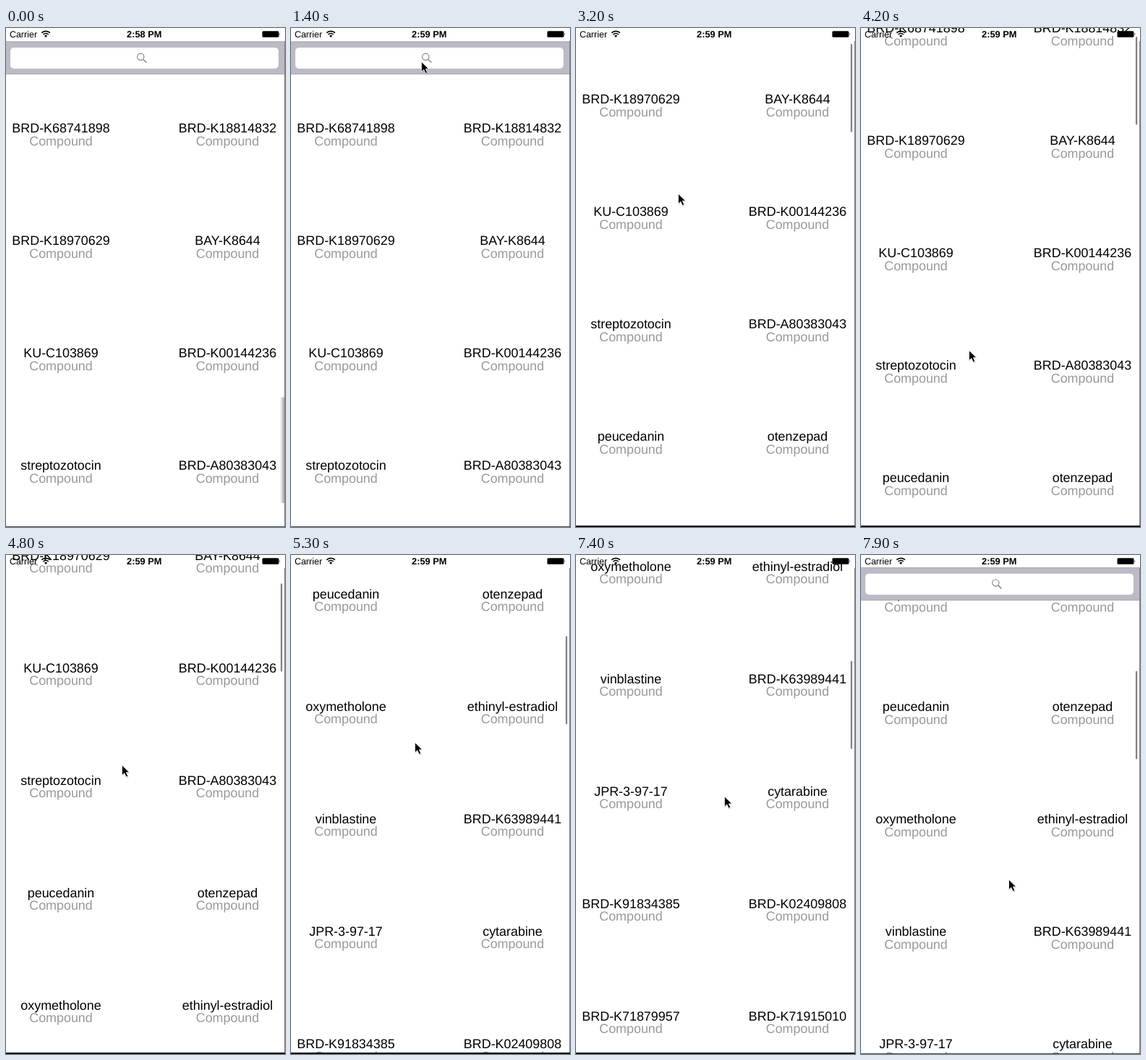
Write an HTML page that moves like this. It is 386 by 688 pixels and loops after 8 s.

```html
<!DOCTYPE html>
<html lang="en">
<head>
<meta charset="utf-8">
<title>Compound list</title>
<style>
  html, body { margin: 0; width: 100%; height: 100%; overflow: hidden; background: #fff; }
  svg { display: block; width: 100vw; height: 100vh; }
  text {
    font-family: "Liberation Sans", Arial, sans-serif; font-size: 17.9px;
    text-anchor: middle; text-rendering: geometricPrecision;
  }
  .kind { fill: #999; }
  .status text { font-size: 12.5px; }
  .status #clock { font-size: 12.8px; font-weight: bold; }
</style>
</head>
<body>
<svg viewBox="0 0 386 688">
  <defs>
    <linearGradient id="shade">
      <stop offset="0" stop-color="#777" stop-opacity="0"/>
      <stop offset="1" stop-color="#777" stop-opacity=".75"/>
    </linearGradient>
  </defs>
  <rect width="386" height="688" fill="#fff"/>
  <g id="list"></g>
  <rect id="indicator" x="380" width="2.2" height="121.5" rx="1.1" fill="#808080"/>

  <g id="bar">
    <rect y="-5" width="386" height="24" fill="#fff"/>
    <rect y="18.5" width="386" height="45.5" fill="#bcbbc5"/>
    <path d="M0 19h386M0 63.5h386" stroke="#a9a8b2"/>
    <rect x="6" y="27" width="371" height="29" rx="5" fill="#fff"/>
    <g fill="none" stroke="#85858a" stroke-width="1.2">
      <circle cx="186.3" cy="39.7" r="4.6"/>
      <path d="M189.8 43.2l4.6 4.6" stroke-width="1.5"/>
    </g>
  </g>

  <g class="status">
    <text x="24" y="13">Carrier</text>
    <path d="M49.3 6.7a8.2 8.2 0 0 1 11.6 0M51.4 9a5.3 5.3 0 0 1 7.4 0"
          fill="none" stroke="#000" stroke-width="1.7"/>
    <path d="M55.1 13l-2.1-2.2a3 3 0 0 1 4.2 0z"/>
    <text id="clock" x="191.3" y="13"></text>
    <rect x="354.5" y="4.3" width="23" height="8.4" rx="1.5"/>
    <path d="M378.5 6.8q1.6 1.7 0 3.4z"/>
  </g>

  <rect id="edgeShade" x="379" y="509" width="7" height="146" rx="3" fill="url(#shade)"/>
  <path d="M385.5 18v670" stroke="#8a8a8a"/>
  <path id="bottomEdge" d="M0 688h386" stroke="#111"/>
  <g id="cursor">
    <g transform="scale(.92)">
      <path d="M1 2v15l3.6-3.2 2.8 6 3-1.4-2.8-5.8h5z" opacity=".18"/>
      <path d="M.5 .5v15.2l3.6-3.3 2.6 5.7 2.8-1.2-2.5-5.6h4.6z" stroke="#fff" stroke-width=".9"/>
    </g>
  </g>
</svg>
<script>
const LOOP = 8000, STEP = 100, ROW = 155, BAR = 66, LAST = 984;
const names = `BRD-K68741898 BRD-K18814832 BRD-K18970629 BAY-K8644
  KU-C103869 BRD-K00144236 streptozotocin BRD-A80383043
  peucedanin otenzepad oxymetholone ethinyl-estradiol
  vinblastine BRD-K63989441 JPR-3-97-17 cytarabine
  BRD-K91834385 BRD-K02409808 BRD-K71879957 BRD-K71915010`.split(/\s+/);
const $ = id => document.getElementById(id);

$("list").innerHTML = names.map((name, i) => {
  const x = i % 2 ? 306.5 : 76, y = 144.4 + Math.floor(i / 2) * ROW;
  return `<text x="${x}" y="${y}">${name}</text>
    <text class="kind" x="${x}" y="${y + 17.6}">Compound</text>`;
}).join("");

const ramp = (t, from, to) => Math.min(1, Math.max(0, (t - from) / (to - from)));
const mix = (a, b, u) => a + (b - a) * u;
const easeOut = (u, power = 2) => 1 - (1 - u) ** power;
const easeInOut = u => u * u * (3 - 2 * u);

// Pointer stops: time, x, y
const stops = [
  [200, 378, 575], [500, 58, 330], [900, 154, 106], [1400, 180, 46],
  [1750, 319, 190], [2200, 144, 361], [3200, 141, 228], [3800, 145, 182],
  [4200, 149, 444], [4400, 150, 468], [5000, 165, 200], [5300, 171, 258],
  [6200, 206, 361], [6600, 206, 361], [7000, 206, 218], [7200, 206, 218], [7600, 204, 447]
];

function pointerAt(t) {
  const i = stops.findIndex(s => s[0] > t);
  if (i <= 0) return stops.at(i).slice(1);
  const [t0, x0, y0] = stops[i - 1], [t1, x1, y1] = stops[i], u = ramp(t, t0, t1);
  return [mix(x0, x1, u), mix(y0, y1, u)];
}

// The list follows the pointer while dragged and coasts after each flick.
function scrollAt(t, y) {
  if (t <= 3200) return t < 2200 ? 0 : 361 - y + 62 * ramp(t, 2500, 2700);
  if (t < 3800) return mix(195, 400, easeInOut(ramp(t, 3200, 3800)));
  if (t < 5000) return 582 - y;
  if (t < 7200) return mix(382, LAST, easeOut(ramp(t, 5000, 6250), 2.8));
  return mix(LAST, 549, easeInOut(ramp(t, 7200, 7900)));
}

const move = (id, x, y) => $(id).setAttribute("transform", `translate(${x} ${y})`);
const fade = (id, opacity) => $(id).setAttribute("opacity", opacity);

function draw(now) {
  const t = Math.floor(now % LOOP / STEP) * STEP;
  const [x, y] = pointerAt(t), scroll = scrollAt(t, y);
  const hidden = ramp(t, 2500, 2700) - easeOut(ramp(t, 7600, 7950));
  move("list", 0, -scroll);
  move("bar", 0, -BAR * hidden);
  move("indicator", 0, 0.1765 * scroll - 12.4 + 77 * (1 - hidden));
  move("cursor", x, y);
  fade("indicator", ramp(t, 2200, 2300) - ramp(t, 6000, 6200) + ramp(t, 7200, 7300));
  fade("cursor", t < 200 ? 0 : 1);
  fade("edgeShade", t < 200 ? 1 : 0);
  $("bottomEdge").setAttribute("stroke-width", hidden > 0.5 ? 4 : 1.6);
  $("clock").textContent = t < 400 ? "2:58 PM" : "2:59 PM";
  requestAnimationFrame(draw);
}
requestAnimationFrame(draw);
</script>
</body>
</html>
```
